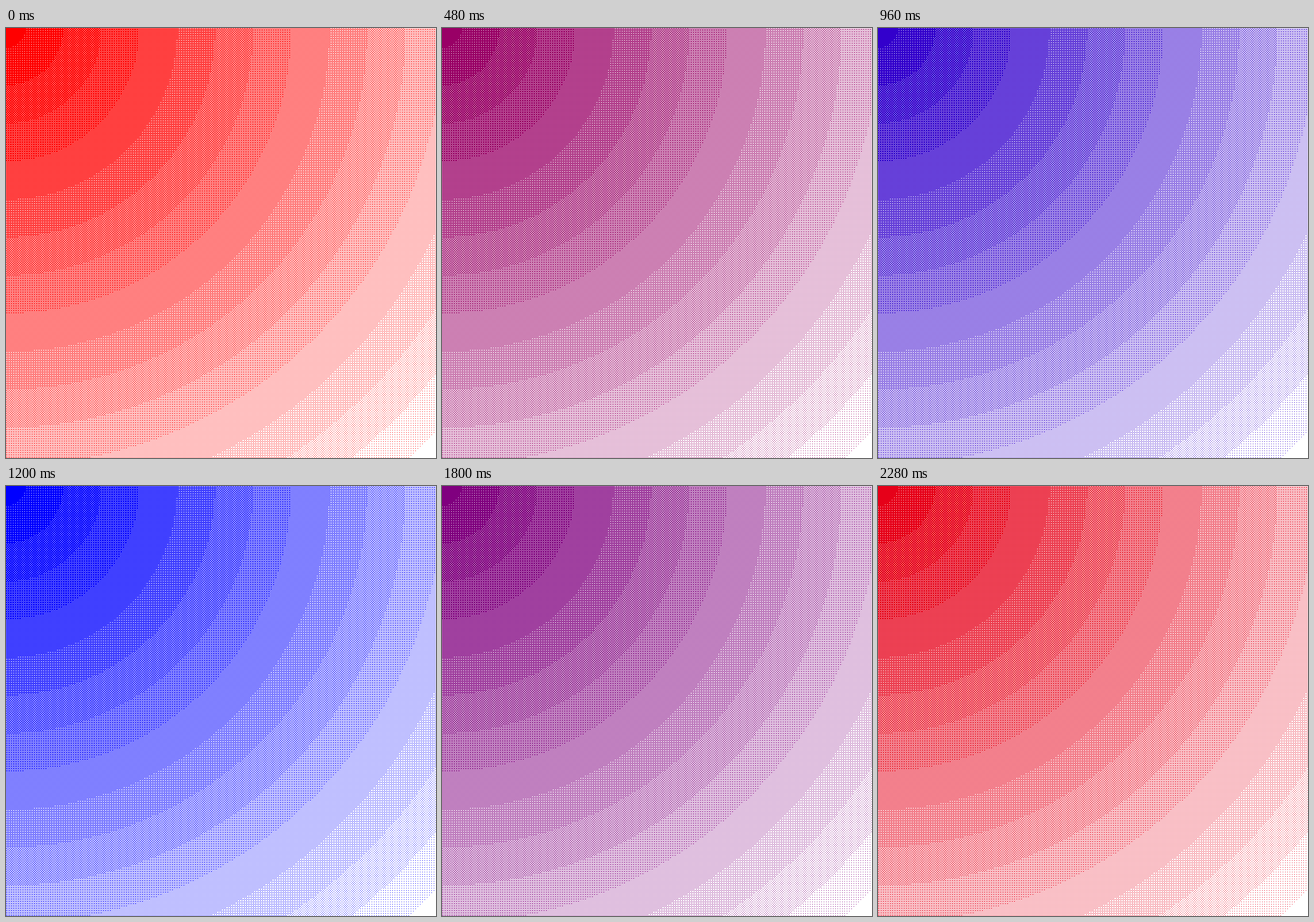
Recreate the animation shown at these times as an HTML page with a canvas. Size 748 by 748 pixels, loop 2.4 s.

```html
<!DOCTYPE html>
<html lang="en">
<head>
<meta charset="utf-8">
<title>Halftone glow</title>
<style>
  html, body { margin: 0; width: 100%; height: 100%; overflow: hidden; background: #f00; }
  canvas { display: block; }
</style>
</head>
<body>
<canvas id="stage" width="748" height="748"></canvas>
<script>
const SIZE = 748, STEP = 120, HALF = 10;
const reach = SIZE * Math.SQRT2;
const ctx = document.getElementById("stage").getContext("2d");

// Ordered 4x4 threshold, built by interleaving the bits of x^y and y
function threshold(x, y) {
  let rank = 0;
  for (let bit = 0; bit < 2; bit++) {
    const a = x >> bit & 1, b = y >> bit & 1;
    rank = rank * 4 + (a ^ b) * 2 + b;
  }
  return (rank + 0.5) / 16;
}

// White dots thicken with distance from the top left corner
ctx.fillStyle = "#fff";
for (let y = 0; y < SIZE; y++) {
  for (let x = 0; x < SIZE; x++) {
    if (Math.hypot(x, y) / reach > threshold(x, y)) ctx.fillRect(x, y, 1, 1);
  }
}

// Red to blue and back, in even steps, showing between the dots
function draw(now) {
  const step = Math.floor(now / STEP) % (2 * HALF);
  const blue = (HALF - Math.abs(step - HALF)) / HALF;
  const red = Math.round(255 * (1 - blue));
  document.body.style.background = `rgb(${red}, 0, ${255 - red})`;
  requestAnimationFrame(() => draw(performance.now()));
}
draw(performance.now());
</script>
</body>
</html>
```
